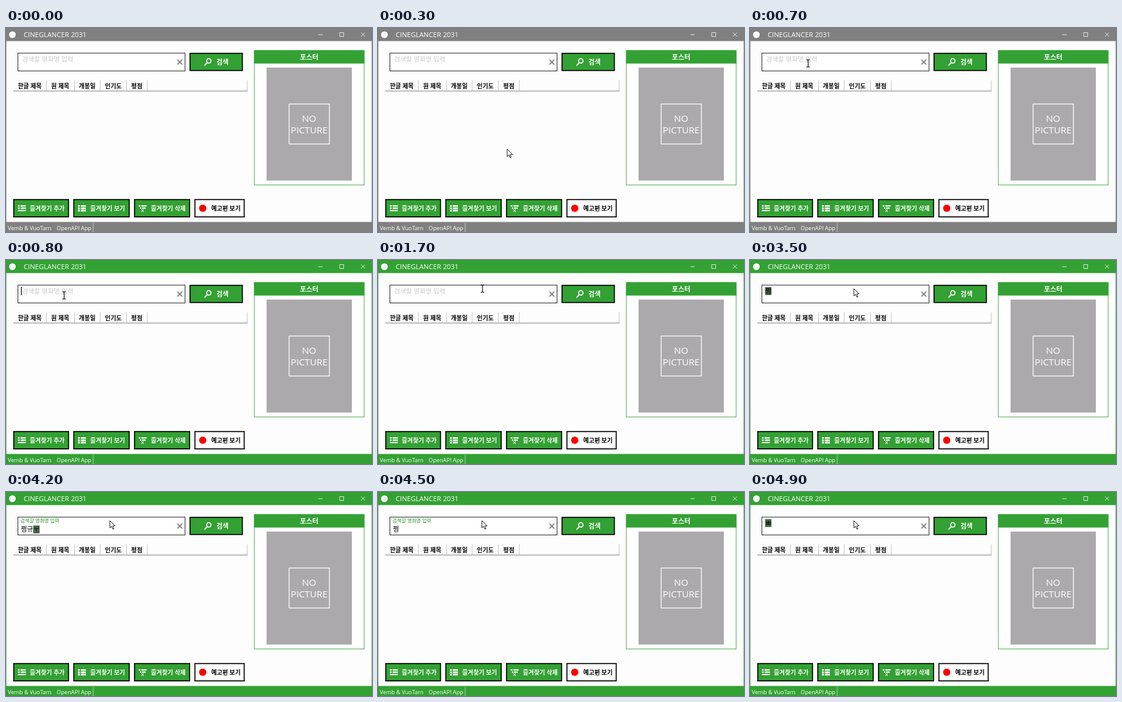
An HTML page that plays this animation: 600 px wide and 335 px high, repeating every 5 s.

```html
<!DOCTYPE html>
<html lang="ko">
<head>
<meta charset="utf-8">
<title>Movie search</title>
<style>
  html, body { margin: 0; width: 100%; height: 100%; overflow: hidden; background: #fefdfe; }
  svg { display: block; width: 100vw; height: 100vh; --chrome: #808080; }
  svg.active { --chrome: #33a133; }
  text { font: 9.9px "Open Sans", "Noto Sans CJK KR", "Noto Sans CJK", sans-serif; white-space: pre; }
  .chrome { fill: var(--chrome); }
  .green { fill: #33a133; }
  .white { fill: #fff; }
  .bold { font-weight: 700; }
  .line { fill: none; stroke: #fff; }
  .button { stroke: #000; stroke-width: 1.7; }
  .middle { text-anchor: middle; }
  .status { font-size: 9.2px; }
  .input { font-size: 10.8px; }
</style>
</head>
<body>
<svg id="stage" viewBox="0 0 600 335">
  <rect width="600" height="335" fill="#fefdfe"/>

  <!-- window frame -->
  <path class="chrome" d="M0 0H600V335H0ZM.6 21.6V318.4H599.4V21.6Z" fill-rule="evenodd"/>
  <circle class="white" cx="10.5" cy="11" r="5.5"/>
  <text class="white" x="29" y="15" style="font-size:11.2px">CINEGLANCER 2031</text>
  <path class="line" d="M512 11H519M547 7.5H553.5V14H547ZM582 7.5L588.5 14M588.5 7.5L582 14" stroke-width=".8"/>
  <text class="white status" x="3" y="331.7">Vemb &amp; VuoTarn</text>
  <text class="white status" x="83" y="331.7">OpenAPI App</text>
  <path class="line" d="M143 320V335" opacity=".6"/>

  <!-- search row -->
  <rect x="19.5" y="41.2" width="274" height="29.4" fill="#fff" stroke="#222"/>
  <path d="M281 52L289 60M289 52L281 60" stroke="#858585" stroke-width="1.8"/>
  <rect class="green button" x="301.7" y="41.6" width="85.8" height="28.2"/>
  <g class="line" stroke-width="1.7"><circle cx="332.5" cy="54" r="3.6"/><path d="M330 57L325.5 61.5" stroke-width="2.2"/></g>
  <text class="white bold" x="345" y="60" style="font-size:10.8px">검색</text>

  <!-- result table and buttons -->
  <g id="table"></g>
  <path d="M12 103.5H396" stroke="#b8b8b8" stroke-width="2"/>
  <g id="buttons"></g>
  <circle cx="322.5" cy="296" r="6" fill="#f00"/>

  <!-- poster panel -->
  <rect x="407.1" y="37" width="180" height="220.8" fill="#fff" stroke="#33a133" stroke-width=".9"/>
  <rect class="green" x="406.7" y="36.6" width="180.8" height="21.8"/>
  <text class="white bold middle" x="497" y="51.5" style="font-size:11px">포스터</text>
  <rect x="427.2" y="65" width="139.8" height="185.5" fill="#aba9ab"/>
  <rect class="line" x="464.2" y="124.8" width="66" height="65.7" stroke-width="1.3"/>
  <text class="white middle" x="497" y="154.2" style="font-size:15.2px">NO</text>
  <text class="white middle" x="497" y="173.2" style="font-size:15.2px">PICTURE</text>

  <!-- animated parts -->
  <text id="hint">검색할 영화명 입력</text>
  <text id="typed" class="input" x="24.5"></text>
  <g id="composing">
    <rect width="10.5" height="13" fill="#4a664c"/>
    <text id="jamo" class="input middle" x="5.2" y="10.3"></text>
  </g>
  <rect id="caret" x="24.6" y="44" width="1.2" height="14"/>
  <path id="beam" d="M-3 -6H-1L0 -5 1 -6H3M0 -5V5M-3 6H-1L0 5 1 6H3" fill="none" stroke="#000" stroke-width="1.1"/>
  <path id="arrow" d="M0 0V12L2.8 9.4 4.8 14 6.7 13.2 4.8 8.8H8.8Z" fill="#fff" stroke="#000" stroke-width=".9"/>
</svg>
<script>
const $ = id => document.getElementById(id);
const show = (id, on) => $(id).style.display = on ? '' : 'none';
const moveTo = (id, x, y) => $(id).setAttribute('transform', `translate(${x} ${y})`);
const clamp = v => Math.min(1, Math.max(0, v));
const mix = (a, b, k) => a + (b - a) * k;
const ease = k => k * k * (3 - 2 * k);

const columns = [[19.5, 66.3, '한글 제목'], [74, 112.3, '원 제목'], [119.5, 154.3, '개봉일'],
  [162.3, 197.3, '인기도'], [205.3, 231.5, '평점'], [0, 395.3, '']];
$('table').innerHTML = columns.map(([x, edge, label]) =>
  `<text class="bold" x="${x}" y="98.5">${label}</text><path d="M${edge} 86V103" stroke="#c4c4c4"/>`).join('');

const listIcon = 'M0 0h3v2.6h-3zM4.5 0h8.5v2.6h-8.5zM0 3.8h3v2.6h-3zM4.5 3.8h8.5v2.6h-8.5zM0 7.6h3v2.6h-3zM4.5 7.6h8.5v2.6h-8.5z';
const addIcon = 'M0 0h3v2.2h-3zM4.5 0h8.5v2.2h-8.5zM0 3.8h3v2.2h-3zM4.5 3.8h8.5v2.2h-8.5zM0 7.8h13v2h-13z';
const removeIcon = 'M0 0h3v2.2h-3zM4.5 0h8.5v2.2h-8.5zM2 3.8h2.5v2h-2.5zM5.5 3.8h6v2h-6zM4 7.4l.8-.8 1.5 1.5 1.5-1.5.8.8-1.5 1.5 1.5 1.5-.8.8-1.5-1.5-1.5 1.5-.8-.8 1.5-1.5z';
const buttons = [[12, 91, 27, '즐겨찾기 추가', addIcon], [110.5, 92, 27.5, '즐겨찾기 보기', listIcon],
  [210, 91.5, 27.5, '즐겨찾기 삭제', removeIcon], [309, 82, 27.5, '예고편 보기', '']];
$('buttons').innerHTML = buttons.map(([x, width, indent, label, icon]) => {
  const tone = icon ? 'green' : 'white';
  return `<rect class="${tone} button" x="${x + .7}" y="281.7" width="${width - 1.2}" height="28.5"/>
    <path class="white" d="${icon}" transform="translate(${x + 7.5} 291)"/>
    <text class="bold ${icon ? 'white' : ''}" x="${x + indent}" y="299.7">${label}</text>`;
}).join('');

// [time, committed text, syllable being composed]
const typing = [[0, '', ''], [3200, '', 'ㅉ'], [3300, '', '쩌'], [3500, '', '쩡'], [3600, '쩡', 'ㄱ'],
  [3900, '쩡', '규'], [4200, '쩡규', 'ㅜ'], [4300, '쩡', '규'], [4400, '쩡', 'ㄱ'], [4500, '쩡', ''],
  [4600, '', ''], [4900, '', 'ㅃ']];

function drawInput(t) {
  const [, text, jamo] = typing.filter(step => step[0] <= t).pop();
  const float = ease(clamp((t - 3500) / 200)) * (1 - ease(clamp((t - 4500) / 200)));
  const raised = text !== '';
  show('hint', raised || !jamo);
  $('hint').style.fontSize = mix(10.65, 8.1, float) + 'px';
  $('hint').style.fill = raised ? '#2b922b' : '#c6c6c6';
  moveTo('hint', mix(26.5, 23.5, float), mix(55, 50, float));

  const drop = raised ? 10.5 * float : 0;
  $('typed').textContent = text;
  $('typed').setAttribute('y', 54.5 + drop);
  show('composing', jamo);
  $('jamo').textContent = jamo;
  moveTo('composing', 24.7 + text.length * 9.94, 44.5 + drop);

  const blink = Math.floor((t - 800) / 545) % 2 === 0;
  show('caret', t >= 800 && !raised && !jamo && (t < 3200 ? blink : t >= 4600));
}

function drawPointer(t) {
  const enter = ease(clamp(t / 600));
  const shift = ease(clamp((t - 1100) / 400));
  const x = t < 700 ? mix(330, 95, enter) : mix(95, 171, shift);
  const y = t < 700 ? mix(340, 58, enter) : mix(58, 47, shift);
  const overInput = x > 19 && x < 294 && y > 41 && y < 71;
  const beam = overInput && t < 3200;
  show('beam', beam);
  show('arrow', t >= 100 && !beam);
  moveTo('beam', x + .3, y);
  moveTo('arrow', x - .7, y);
}

function frame() {
  const t = Math.floor(performance.now() % 5000 / 100) * 100;
  $('stage').classList.toggle('active', t >= 800);
  drawInput(t);
  drawPointer(t);
  requestAnimationFrame(frame);
}
frame();
</script>
</body>
</html>
```
